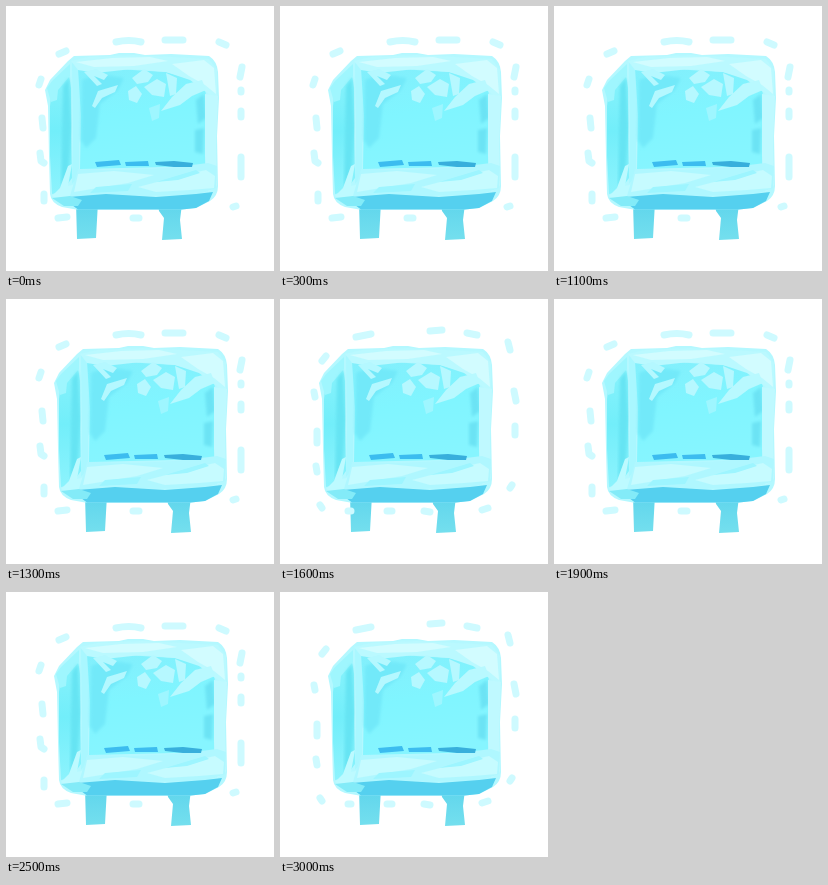
An HTML page that plays this animation: 268x265 px, repeating every 3100 ms.

```html
<!DOCTYPE html>
<html lang="en">
<head>
<meta charset="utf-8">
<title>Shivering ice cube</title>
<style>
html, body { margin: 0; width: 100%; height: 100%; overflow: hidden; background: #fff; }
svg { display: block; width: 100vw; height: 100vh; }
.dashes { fill: none; stroke: #cefaff; stroke-width: 7; stroke-linecap: round; stroke-linejoin: round; }
</style>
</head>
<body>
<svg viewBox="0 0 268 265">
  <defs>
    <linearGradient id="front" x1="0" y1="0" x2=".2" y2="1">
      <stop offset="0" stop-color="#82effc"/>
      <stop offset=".5" stop-color="#80f5ff"/>
      <stop offset="1" stop-color="#86f5ff"/>
    </linearGradient>
    <linearGradient id="side" x1="0" y1="0" x2="0" y2="1">
      <stop offset="0" stop-color="#8af3fc"/>
      <stop offset=".5" stop-color="#72eefa"/>
      <stop offset="1" stop-color="#8cf3fd"/>
    </linearGradient>
    <linearGradient id="leg" x1="0" y1="0" x2="0" y2="1">
      <stop offset="0" stop-color="#5fd5ec"/>
      <stop offset="1" stop-color="#74dfee"/>
    </linearGradient>
    <filter id="soft"><feGaussianBlur stdDeviation="1.5"/></filter>
  </defs>

  <g class="dashes" id="wideDashes">
    <path d="M53 48L60 45M110 36Q123 33 135 36M159 34L177 34M213 36L220 39"/>
    <path d="M236 61L234 71M235 84V86M235 105V111M235 151V171M227 201L230 200"/>
    <path d="M127 212H133M52 212L61 211M38 188V195M34 147L35 155L38 157M36 112L37 122M35 73L33 79"/>
  </g>

  <g id="cube">
    <path fill="url(#leg)" d="M70 196H92L90 232L71 233ZM152 198L176 198L174 214L176 233L156 234L158 212L153 205Z"/>
    <path fill="#b4f8ff" d="M62 55L68 50L104 49L113 47L128 47L139 49L165 48L203 50Q211 55 212 66L213 92L211 130L212 180Q212 190 204 195L190 202L176 203.500H70L56 201Q45 197 44 188L43 150L42 100L39 84L44 74Z"/>

    <path fill="url(#side)" d="M46 82L62 62L65 82L65 130L66 172L56 186L46 188L44 150L44 100Z"/>
    <path fill="#9ff6fe" d="M41 82L46 75L64 58L64 70L52 84L51 94L45 96Z"/>
    <path fill="#66e4f3" d="M57 80L63 72L65 120L63 162L55 182L56 130Z" filter="url(#soft)"/>
    <path fill="#bdfaff" d="M46 190L54 182L62 160L66 158L62 180L74 177L68 190L57 199Z"/>
    <path fill="#a9f7ff" d="M66 57L74 60L76 100L73 140L73 170L66 178L67 130Z"/>

    <path fill="url(#front)" d="M72 62L110 63L160 66L199 76L201 110L199 160L74 163L75 110Z"/>
    <path fill="#72e9f9" d="M76 74L92 68L118 72L112 84L94 98L90 132L80 142L75 134Z" filter="url(#soft)"/>
    <path fill="#6ce3f4" d="M190 94L198 88L200 112L192 118ZM189 124L198 122L197 148L189 146Z" filter="url(#soft)"/>

    <path fill="#baf9ff" d="M65 55L82 51L128 49L166 51L203 53L211 64L211 95L200 86L184 74L160 66L126 63L90 67L72 64Z"/>
    <path fill="#d2fcff" d="M70 56L106 52L144 51L162 55L128 60L88 61ZM166 58L198 54L208 62L210 88L199 79L183 70Z"/>
    <path fill="#b4f8ff" d="M78 66L90 63L102 69L98 74L88 70L96 78L91 80ZM92 85L112 79L109 86L96 92L89 102L86 100Z"/>
    <path fill="#b6f8ff" d="M126 72L138 63L147 69L142 76L131 78ZM122 85L130 80L136 88L131 97L123 94ZM138 81L151 73L160 78L158 91L146 89ZM160 67L171 72L170 88L164 90Z"/>
    <path fill="#b8f9ff" d="M155 105L166 91L180 78L196 74L200 84L186 90L174 99Z"/>
    <path fill="#9ef6ff" d="M143 102L154 98L153 112L146 115Z"/>
    <path fill="#bff9ff" d="M199 88L212 90L210 140L211 180L202 186L199 150Z"/>

    <path fill="#aff7ff" d="M72 163L120 164L162 162L202 157L211 160L210 182L190 189L100 190L64 190Z"/>
    <path fill="#c6fbff" d="M72 168L108 165L148 169L122 177L68 186ZM132 181L174 170L200 164L209 170L208 182L184 184L150 186Z"/>
    <path fill="#9df5ff" d="M150 176L190 164L194 167L172 174ZM90 181L126 178L122 185L84 187Z"/>
    <path fill="#55d0ef" d="M62 191L100 188L150 191L190 188L207 186L203 195L190 202L176 203.500H72L66 199Z"/>
    <path fill="#83ebf8" d="M46 192L64 190L76 194L72 200L58 200Z"/>

    <path fill="#3cbcef" d="M89 156L113 154L115 159L91 161ZM119 156L142 155L143 160L120 160Z"/>
    <path fill="#38afdc" d="M149 156L168 155L187 157L186 161L168 161L150 159Z"/>
  </g>

  <g class="dashes" id="tiltDashes">
    <path d="M42 62L46 57M76 38L91 35M150 32L162 31M187 34L197 36M228 43L230 51"/>
    <path d="M234 92L236 102M235 127V136M232 186L230 189M202 211L208 209"/>
    <path d="M144 212L150 213M107 212H112M68 212H71M40 206L42 209M36 167L37 173M37 132V144M34 93L35 98"/>
  </g>
</svg>
<script>
const STEP = 100, COUNT = 31, SHIFT = 9;
const byId = id => document.getElementById(id);
const cube = byId('cube'), wide = byId('wideDashes'), tilt = byId('tiltDashes');

function draw() {
  const i = Math.floor(performance.now() / STEP) % COUNT;
  const odd = i % 2 === 1;
  const right = odd || i === COUNT - 1;
  const tilted = !odd && i > 0;
  cube.setAttribute('transform', `translate(${right ? SHIFT : 0} 0)`);
  wide.style.display = tilted ? 'none' : '';
  tilt.style.display = tilted ? '' : 'none';
  requestAnimationFrame(draw);
}
draw();
</script>
</body>
</html>
```
